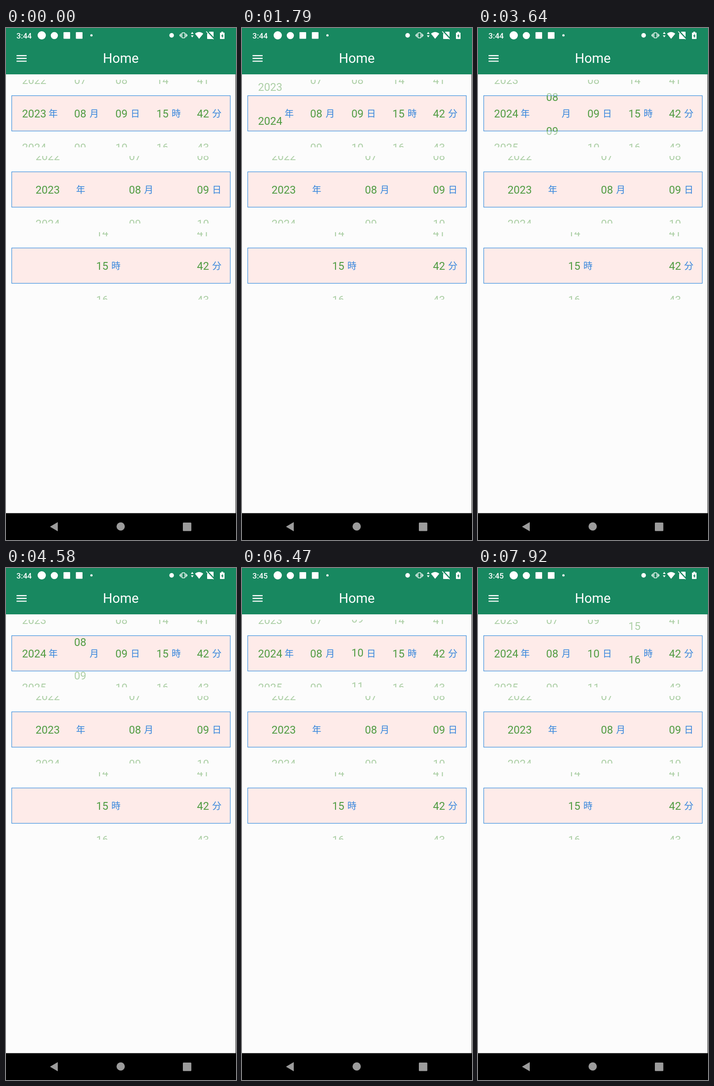
An HTML page that plays this animation: 502 by 1116 pixels, repeating every 8000 ms.

```html
<!DOCTYPE html>
<html lang="ja">
<head>
<meta charset="utf-8">
<title>Date and time wheels</title>
<style>
  html, body { margin: 0; width: 100%; height: 100%; overflow: hidden; background: #fcfcfc; }
  svg { display: block; width: 100vw; height: 100vh; }
  text { text-anchor: middle; }
  .num { font: 23.6px Roboto, "Noto Sans", sans-serif; fill: #519c43; }
  .unit { font: 20px "Noto Sans CJK JP", "Noto Sans CJK TC", "Noto Sans CJK", sans-serif; fill: #3485dc; }
  .title { font: 29px Roboto, sans-serif; fill: #fff; }
  .clock { font: 500 17px Roboto, sans-serif; fill: #fff; }
  .band { fill: #feebe9; stroke: #3b90de; stroke-width: 1.2; }
  .faded { opacity: .46; }
</style>
</head>
<body>
<svg id="stage" viewBox="0 0 502 1116" preserveAspectRatio="none">
  <rect width="502" height="1116" fill="#fcfcfc"/>
  <rect width="502" height="101" fill="#188860"/>
  <rect x="501" y="101" width="1" height="957" fill="#222"/>

  <text id="clock" class="clock" x="39.5" y="22.5">3:44</text>
  <g fill="#fff">
    <circle cx="78" cy="16" r="9"/>
    <circle cx="105.5" cy="16.5" r="7.8"/>
    <rect x="125.5" y="9" width="14.5" height="14.5" rx="1"/>
    <rect x="152.5" y="9" width="14.5" height="14.5" rx="1"/>
    <circle cx="186.5" cy="16" r="2.5"/>
    <circle cx="361.5" cy="16" r="5"/>
    <path d="M406.5 8.5l3 4.5h-6zM406.5 20.5l3-4.5h-6z"/>
    <path d="M412.5 12.5Q421.5 5 430.5 12.5L421.5 23.5Z"/>
    <path d="M444 8h8a1 1 0 0 1 1 1v14a1 1 0 0 1-1 1h-12a1 1 0 0 1-1-1V13z"/>
    <path d="M470 10V8h4v2h2a1 1 0 0 1 1 1v12a1 1 0 0 1-1 1h-8a1 1 0 0 1-1-1V11a1 1 0 0 1 1-1z"/>
    <path d="M23 59h22v2.4h-22zM23 65.1h22v2.4h-22zM23 71.2h22v2.4h-22z"/>
  </g>
  <path d="M473 12.5l-3.5 5.5h2v4l3.5-5.5h-2z" fill="#188860"/>
  <g fill="none" stroke="#fff" stroke-width="1.5">
    <rect x="384" y="10.5" width="6.5" height="11" rx="1"/>
    <path d="M381.5 12v8M393 12v8M379.5 14v4M395 14v4"/>
  </g>
  <path d="M439 7L455 24" stroke="#188860" stroke-width="3"/>
  <path d="M437 7.5L453 24.5" stroke="#fff" stroke-width="1.7"/>
  <text class="title" x="250.5" y="76">Home</text>

  <defs id="clips"></defs>
  <g id="pickers"></g>

  <rect y="1057.5" width="502" height="59" fill="#000"/>
  <g fill="#9c9c9c">
    <path d="M96 1087L113 1077V1097Z"/>
    <circle cx="250.3" cy="1086.5" r="9"/>
    <rect x="386" y="1078" width="18.5" height="18.5" rx="1.5"/>
  </g>
</svg>
<script>
const LOOP = 8000, CLOCK_TICK = 4600;
const STEP = 73.5, HALF_BAND = 38.5;

// [time, scrolled items, settles]; a wheel rests at 0 before its first entry
const moves = {
  year: [[1230, .08], [1410, .556], [1790, .785], [2200, 1.1], [2870, 1, true]],
  month: [[3360, .06], [3640, .485], [3950, .84], [4250, .88], [4500, .45], [4700, .2], [5240, 0, true]],
  day: [[5890, .125], [6200, .7], [6550, 1.13], [6850, 1.18], [7460, 1, true]],
  hour: [[7730, .09], [7920, .825]]
};

// centre line, then wheels: [number x, value, unit x, unit, move]
const pickers = [
  [186.5, [
    [61.5, 2023, 103, '年', 'year'], [162, 8, 192.5, '月', 'month'],
    [252, 9, 282, '日', 'day'], [341.5, 15, 371.5, '時', 'hour'], [430, 42, 460, '分']]],
  [352.5, [[91, 2023, 163, '年'], [281.5, 8, 311.5, '月'], [430, 9, 460, '日']]],
  [518.5, [[210, 15, 240, '時'], [430, 42, 460, '分']]]
];

function add(parent, tag, attrs, text) {
  const node = document.createElementNS('http://www.w3.org/2000/svg', tag);
  for (const key in attrs) node.setAttribute(key, attrs[key]);
  if (text) node.textContent = text;
  parent.append(node);
  return node;
}

const clips = document.getElementById('clips');
const root = document.getElementById('pickers');
const clock = document.getElementById('clock');
const strips = [];

function addClip(id, ...spans) {
  const clip = add(clips, 'clipPath', { id });
  for (const [y, height] of spans) add(clip, 'rect', { x: 0, y, width: 502, height });
}

function addStrip(layer, x, cy, value, move) {
  const strip = add(layer, 'g', {});
  for (let i = -2; i <= 3; i++) {
    const label = String(value + i).padStart(2, '0');
    add(strip, 'text', { class: 'num', x, y: cy + i * STEP + 8.7 }, label);
  }
  if (move) strips.push([strip, moves[move]]);
}

pickers.forEach(([cy, wheels], n) => {
  const edge = STEP - HALF_BAND;
  addClip('in' + n, [cy - HALF_BAND, 2 * HALF_BAND]);
  addClip('out' + n, [cy - STEP, edge], [cy + HALF_BAND, edge]);
  add(root, 'rect', { class: 'band', x: 12.5, y: cy - HALF_BAND - .5, width: 477, height: 2 * HALF_BAND });
  const sharp = add(root, 'g', { 'clip-path': `url(#in${n})` });
  const faded = add(root, 'g', { 'clip-path': `url(#out${n})`, class: 'faded' });
  for (const [x, value, unitX, unit, move] of wheels) {
    addStrip(sharp, x, cy, value, move);
    addStrip(faded, x, cy, value, move);
    add(root, 'text', { class: 'unit', x: unitX, y: cy + 7.7 }, unit);
  }
});

function scrollAt(keys, t) {
  if (t < keys[0][0]) return 0;
  const next = keys.findIndex(key => key[0] > t);
  if (next < 0) return keys[keys.length - 1][1];
  const [t0, from] = keys[next - 1];
  const [t1, to, settles] = keys[next];
  const u = (t - t0) / (t1 - t0);
  return from + (to - from) * (settles ? 1 - (1 - u) ** 3 : u);
}

const start = performance.now();

function draw() {
  const t = Math.max(0, performance.now() - start) % LOOP;
  for (const [strip, keys] of strips) {
    strip.setAttribute('transform', `translate(0 ${-STEP * scrollAt(keys, t)})`);
  }
  clock.textContent = t < CLOCK_TICK ? '3:44' : '3:45';
  requestAnimationFrame(draw);
}
draw();
</script>
</body>
</html>
```
